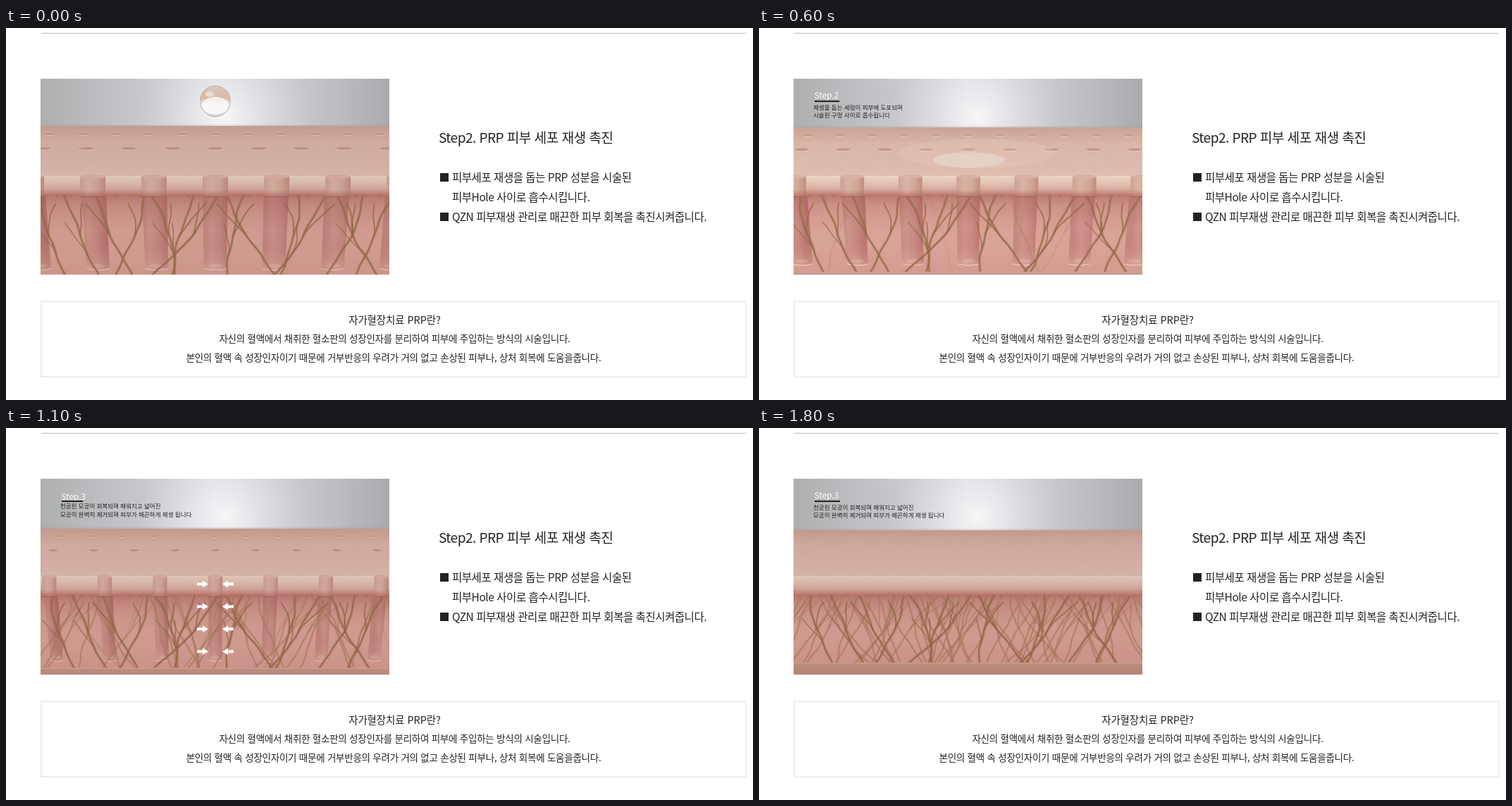
Animation of 1060x528 px, one loop 1900 ms. Source, as an HTML page with a canvas:

```html
<!DOCTYPE html>
<html lang="ko">
<head>
<meta charset="utf-8">
<title>PRP 피부 세포 재생</title>
<style>
  html, body { margin: 0; width: 100%; height: 100%; overflow: hidden; background: #fff; }
  canvas { position: absolute; left: 49px; top: 72px; }
  svg { position: absolute; left: 0; top: 0; }
  text { font-family: "Noto Sans CJK KR", "Noto Sans KR", "Noto Sans CJK", sans-serif; fill: #222; }
  .title { font-size: 19.2px; letter-spacing: -.62px; }
  .body { font-size: 15.5px; font-weight: 300; letter-spacing: -.46px; }
  .head { font-size: 14.5px; letter-spacing: -.1px; text-anchor: middle; }
  .note { font-size: 13.5px; font-weight: 300; letter-spacing: -.24px; text-anchor: middle; }
  .cap { opacity: 0; }
  .cap text { font-size: 8.5px; }
  .cap .step { font-size: 11.8px; fill: #fff; }
</style>
</head>
<body>
<canvas width="495" height="278"></canvas>
<svg width="1060" height="528" viewBox="0 0 1060 528">
  <path d="M50 7.5H1050" stroke="#bdbdbd"/>
  <text class="title" x="614" y="163">Step2. PRP 피부 세포 재생 촉진</text>
  <path d="M616 206h12v12h-12zM616 262h12v12h-12z" fill="#222"/>
  <text class="body" x="633" y="218">피부세포 재생을 돕는 PRP 성분을 시술된</text>
  <text class="body" x="633" y="246">피부Hole 사이로 흡수시킵니다.</text>
  <text class="body" x="633" y="274">QZN 피부재생 관리로 매끈한 피부 회복을 촉진시켜줍니다.</text>
  <rect x="50" y="388" width="1000" height="107" fill="none" stroke="#ddd"/>
  <text class="head" x="551.5" y="419.5">자가혈장치료 PRP란?</text>
  <text class="note" x="551.5" y="446">자신의 혈액에서 채취한 혈소판의 성장인자를 분리하여 피부에 주입하는 방식의 시술입니다.</text>
  <text class="note" x="550" y="473">본인의 혈액 속 성장인자이기 때문에 거부반응의 우려가 거의 없고 손상된 피부나, 상처 회복에 도움을줍니다.</text>
  <g class="cap">
    <text class="step" x="78.5" y="100">Step.2</text>
    <rect class="bar" x="79" y="103" width="35" height="2" fill="#222"/>
    <g class="lines">
      <text x="77" y="115.5">재생을 돕는 세럼이 피부에 도포되며</text>
      <text x="77" y="127">시술된 구멍 사이로 흡수됩니다</text>
    </g>
  </g>
  <g class="cap">
    <text class="step" x="78.5" y="100">Step.3</text>
    <rect class="bar" x="79" y="103" width="36" height="2" fill="#222"/>
    <g class="lines">
      <text x="77" y="115.5">천공된 모공이 회복되며 매워지고 넓어진</text>
      <text x="77" y="127">모공이 완벽히 제거되며 피부가 매끈하게 재생 됩니다</text>
    </g>
  </g>
</svg>
<script>
const ctx = document.querySelector('canvas').getContext('2d');
const caps = [...document.querySelectorAll('.cap')];
const L = 49, R = 544, T = 72, B = 350, CX = 297, EDGE = 211, RED = 237;
const LOOP = 1900, TICK = 100;

function seeded(s) {
  return () => (s = (s * 16807) % 2147483647) / 2147483647;
}

// piecewise linear value through tick, value pairs
function key(n, ...p) {
  if (n <= p[0]) return p[1];
  for (let k = 2; k < p.length; k += 2) {
    if (n <= p[k]) return p[k - 1] + (p[k + 1] - p[k - 1]) * (n - p[k - 2]) / (p[k] - p[k - 2]);
  }
  return p[p.length - 1];
}

function ramp(x0, y0, x1, y1, colors) {
  const g = ctx.createLinearGradient(x0, y0, x1, y1);
  colors.forEach((c, k) => g.addColorStop(k / (colors.length - 1), c));
  return g;
}

function glow(x, y, r, colors) {
  const g = ctx.createRadialGradient(x, y, 0, x, y, r);
  colors.forEach((c, k) => g.addColorStop(k / (colors.length - 1), c));
  return g;
}

function oval(x, y, rx, ry, fill) {
  ctx.beginPath();
  ctx.ellipse(x, y, Math.max(rx, 0), Math.max(ry, 0), 0, 0, 7);
  ctx.fillStyle = fill;
  ctx.fill();
}

function box(x, y, w, h, fill) {
  ctx.fillStyle = fill;
  ctx.fillRect(x, y, w, h);
}

// x at the top, middle and bottom of each strong root
const strong = [
  [127, 150, 180], [50, 61, 87], [197, 182, 152], [205, 233, 236], [301, 262, 205],
  [268, 246, 238], [312, 343, 384], [337, 321, 314], [416, 409, 386], [452, 421, 380],
  [508, 489, 452], [470, 494, 528], [548, 521, 497], [84, 106, 132]
];
const rnd = seeded(71);
const fine = Array.from({ length: 62 }, (_, k) => {
  const x = 15 + k * 37 % 62 * 9.2 + rnd() * 6;
  const lean = (rnd() < .5 ? -1 : 1) * (14 + rnd() * 36);
  return [x, x + lean * (.5 + rnd() * .5), x + lean * 1.6];
});
const specks = Array.from({ length: 650 }, () => [rnd(), Math.pow(rnd(), .8), rnd()]);

function sky(horizon) {
  box(L, T, R - L, 80, ramp(L, 0, R, 0, ['#adafb0', '#c3c4c7', '#dcdce0', '#c7c8cb', '#a9abad']));
  box(L, T, R - L, 80, glow(310, 125, 120, ['rgba(250,250,252,.9)', 'rgba(235,235,239,.45)', 'rgba(220,220,224,0)']));
  box(L, horizon - 2, R - L, 2, 'rgba(150,140,138,.2)');
}

function surface(n, horizon, gap) {
  box(L, horizon, R - L, EDGE - horizon + 1, ramp(0, horizon, 0, EDGE, ['#cba394', '#d9b5a6', '#dcb9aa', '#debfb0']));
  for (const [u, v, w] of specks) {
    ctx.globalAlpha = (.06 + .28 * w * w) * (.3 + v);
    const y = horizon + 3 + v * (EDGE - horizon - 4);
    box(L + u * (R - L), y, .8 + w * 1.4, .7, w > .35 ? '#f4e3d8' : '#b08a7c');
  }
  ctx.globalAlpha = 1;
  const open = gap / 36;
  if (open <= 0) return;
  for (let k = -6; k <= 6; k++) {
    hole(CX + k * (47 - .25 * n), 151 + .25 * n, 7 * open, 1.1);
    hole(CX + k * (61 - .32 * n), 171 + .25 * n, 11 * open, 1.7);
  }
}

function hole(x, y, rx, ry) {
  oval(x, y + .9, rx, ry, 'rgba(240,218,206,.7)');
  oval(x, y, rx, ry, '#c0958a');
}

function dermis(floor) {
  const top = RED - 4;
  box(L, top, R - L, B - top, ramp(0, top, 0, floor,
    ['#b8756d', '#cc9187', '#d59c91', '#d9a397', '#d9a397', '#d79f94', '#d59b90']));
}

function pore(x, w, foot) {
  const bx = CX + (x - CX) * .955, h = w / 2, bh = h * .9;
  ctx.beginPath();
  ctx.moveTo(x - h, EDGE);
  ctx.lineTo(x + h, EDGE);
  ctx.lineTo(bx + bh, foot);
  ctx.quadraticCurveTo(bx, foot + 4, bx - bh, foot);
  ctx.fillStyle = ramp(x - h, 0, x + h, 0, ['#c58780', '#cf968d', '#c88c84', '#b9776f']);
  ctx.fill();
  ctx.fillStyle = ramp(0, RED, 0, foot, ['rgba(145,70,68,.32)', 'rgba(170,90,88,0)', 'rgba(228,175,163,.4)']);
  ctx.fill();
  ctx.beginPath();
  ctx.moveTo(bx - bh, foot);
  ctx.quadraticCurveTo(bx, foot + 4, bx + bh, foot);
  ctx.strokeStyle = 'rgba(246,222,212,.8)';
  ctx.lineWidth = 1.1;
  ctx.stroke();
  oval(bx, foot - 4, bh * .6, 3, 'rgba(240,200,190,.3)');
}

function rootPath([a, b, c], floor, scale, seed, from, to, spread) {
  ctx.beginPath();
  for (let k = 0; k <= 14; k++) {
    const t = from + (to - from) * k / 14;
    const fork = spread * Math.pow((to - t) / (to - from), 1.3);
    const x = a * (2 * t * t - 3 * t + 1) + b * 4 * t * (1 - t) + c * (2 * t * t - t);
    const wave = Math.sin(t * 9 + seed * 2.3) * 1.6 + Math.sin(t * 21 + seed) * .6;
    ctx.lineTo(CX + (x + wave + fork - CX) * scale, RED + 1 + t * (floor - RED));
  }
}

function root(pts, floor, scale, seed, width, dark, light, forks) {
  const side = seed % 2 ? 1 : -1;
  const parts = [[0, 1, 0, 1], [.1, .5, 20 * side, .6], [.34, .72, -17 * side, .5]];
  for (const [from, to, spread, k] of parts.slice(0, 1 + forks)) {
    rootPath(pts, floor, scale, seed, from, to, spread);
    ctx.save();
    ctx.translate(7, 5);
    ctx.lineWidth = width * 2.6 * k;
    ctx.strokeStyle = 'rgba(140,75,68,.1)';
    ctx.stroke();
    ctx.restore();
    ctx.lineWidth = width * k;
    ctx.strokeStyle = dark;
    ctx.stroke();
    ctx.save();
    ctx.translate(-.4, -.2);
    ctx.lineWidth = width * .4 * k;
    ctx.strokeStyle = light;
    ctx.stroke();
    ctx.restore();
  }
}

function roots(n, floor) {
  const scale = 1 - n * .005;
  ctx.save();
  ctx.beginPath();
  ctx.rect(L, RED, R - L, floor - RED);
  ctx.clip();
  ctx.lineCap = ctx.lineJoin = 'round';
  fine.forEach((p, k) => {
    const a = Math.min(1, (n - 5 - k * .16) / 2);
    if (a <= 0) return;
    ctx.globalAlpha = a * .8;
    root(p, floor, scale, k, 1.4, '#9b7350', '#c9a582', k % 2);
  });
  ctx.globalAlpha = 1;
  strong.forEach((p, k) => root(p, floor, scale, k, 2, '#8a633f', '#ad8459', 1 + k % 2));
  ctx.restore();
}

function epidermis(pores, w) {
  ctx.beginPath();
  ctx.moveTo(L, EDGE);
  ctx.lineTo(R, EDGE);
  for (let x = R; x >= L; x -= 2) {
    ctx.lineTo(x, RED + 1 + Math.sin(x * .9) * 1.1 + Math.sin(x * .37) * 1.3);
  }
  ctx.fillStyle = ramp(0, EDGE, 0, RED + 3, ['#e8cfbf', '#e5c8b8', '#e0bcad', '#d9ab9d', '#c98b80', '#b0655f']);
  ctx.fill();
  for (let x = L; x < R; x += 3) {
    box(x, EDGE - .6 + Math.sin(x * 1.7) * .7, 3, 1.3, 'rgba(244,229,216,.75)');
  }
  if (w <= 0) return;
  const h = w / 2;
  for (const x of pores) {
    box(x - h, EDGE - 1, w, RED - EDGE + 3, ramp(x - h, 0, x + h, 0, ['#cfa292', '#dab3a4', '#d3a999', '#c18d80']));
    box(x - h, RED - 8, w, 11, ramp(0, RED - 8, 0, RED + 3, ['rgba(175,100,92,0)', 'rgba(168,92,86,.7)']));
    oval(x, EDGE - .5, h, Math.min(3.6, h * .35), '#d8b3a4');
    ctx.beginPath();
    ctx.ellipse(x, EDGE - .5, h, Math.min(3.6, h * .35), 0, Math.PI, 2 * Math.PI);
    ctx.lineWidth = .8;
    ctx.strokeStyle = '#e6cdbf';
    ctx.stroke();
  }
}

function drop(n) {
  const y = key(n, 0, 104, 1, 118, 2, 146, 3, 168, 4, 183, 5, 187, 8, 188);
  const rx = key(n, 0, 22, 2, 23, 3, 31, 4, 50, 5, 65, 8, 24, 10, 0);
  const ry = key(n, 0, 22.5, 2, 22, 3, 21, 4, 16, 5, 14, 8, 5, 10, 0);
  const sheen = key(n, 3, 0, 5, .32, 7, .1, 8, 0);
  if (sheen) oval(310, 178, 112, 21, `rgba(236,212,196,${sheen})`);
  if (n > 3) {
    oval(298, y, rx, ry, n === 4 ? 'rgba(236,230,227,.9)' : 'rgba(230,212,201,.85)');
    return;
  }
  if (n === 3) {
    oval(CX, y + 5, rx, ry * .85, 'rgba(170,120,105,.3)');
    oval(CX, y, rx, ry, ramp(0, y - ry, 0, y + ry, ['#e9e9ec', '#f8f8f9', '#e3e3e6', '#d4d0d1']));
    oval(CX - 2, y - 8, 21, 9, 'rgba(255,255,255,.75)');
    oval(CX + 4, y + 8, 20, 7, 'rgba(255,255,255,.45)');
    return;
  }
  oval(CX, y, rx, ry, ramp(0, y - ry, 0, y + ry, ['#d2cbc8', '#dac0b1', '#d8bba9', '#eeebea', '#f4f4f5', '#c9c9cc']));
  oval(CX, y + 6, rx * .86, ry * .55, 'rgba(250,250,251,.8)');
  oval(CX - 8, y - 10, 6, 4, 'rgba(255,255,255,.45)');
  ctx.beginPath();
  ctx.ellipse(CX, y, rx - .8, ry - .8, 0, 0, 7);
  ctx.lineWidth = 1.4;
  ctx.strokeStyle = 'rgba(190,183,181,.7)';
  ctx.stroke();
}

function arrow(tip, y, dir) {
  ctx.beginPath();
  const pts = [[0, 0], [8, -5], [8, -2], [16, -2], [16, 2], [8, 2], [8, 5]];
  for (const [dx, dy] of pts) ctx.lineTo(tip + dx * dir, y + dy);
  ctx.fill();
}

function arrows(n) {
  ctx.globalAlpha = key(n, 9, 0, 10, .6, 11, 1, 14, .9, 15, .65, 16, .3, 17, 0);
  ctx.fillStyle = '#fff';
  const half = key(n, 10, 12, 11, 10, 15, 0);
  const pitch = 31.9 - .22 * (n - 11);
  for (let k = 0; k < 4; k++) {
    arrow(CX - half, 221.5 + k * pitch, -1);
    arrow(CX + half, 221.5 + k * pitch, 1);
  }
  ctx.globalAlpha = 1;
}

function caption(el, alpha, rise, grow) {
  el.style.opacity = alpha;
  el.querySelector('.step').setAttribute('transform', `translate(0 ${rise})`);
  el.querySelector('.lines').setAttribute('transform', `translate(0 ${-rise})`);
  el.querySelector('.bar').setAttribute('width', 36 * grow);
}

function draw(n) {
  const horizon = 139 + n * .34, floor = 353 - n * 1.11;
  const gap = key(n, 0, 36, 8, 33, 11, 20, 14, 3, 15, 0);
  const pitch = 87 - n * .77;
  const pores = [-3, -2, -1, 0, 1, 2, 3].map(k => CX + k * pitch);
  ctx.setTransform(1, 0, 0, 1, -L, -T);
  sky(horizon);
  surface(n, horizon, gap);
  dermis(floor);
  if (gap > 0) pores.forEach(x => pore(x, gap, floor - 11.5));
  roots(n, floor);
  epidermis(pores, gap);
  if (floor < B) {
    box(L, floor, R - L, B - floor, ramp(0, floor, 0, floor + 18, ['#c39687', '#ba8a7b']));
    box(L, floor, R - L, 1, '#d6ad9e');
  }
  const shade = key(n, 0, .09, 4, 0, 8, 0, 11, .1);
  box(L, horizon, R - L, B - horizon, `rgba(115,75,70,${shade})`);
  drop(n);
  arrows(n);
  caption(caps[0], key(n, 1, 0, 2, .5, 3, 1, 6, 1, 7, .7, 8, .3, 9, 0),
    key(n, 2, 4, 3, 2.5, 4, .6, 5, 0), key(n, 2, .35, 3, .73, 4, .92, 5, .98));
  caption(caps[1], key(n, 9, 0, 10, .5, 11, 1),
    key(n, 10, 3.5, 11, 1.5, 12, .3, 13, 0), key(n, 10, .45, 11, .84, 12, .96, 13, 1));
}

let shown = -1;
function play() {
  const n = Math.floor(performance.now() % LOOP / TICK);
  if (n !== shown) draw(shown = n);
  requestAnimationFrame(play);
}
play();
</script>
</body>
</html>
```
